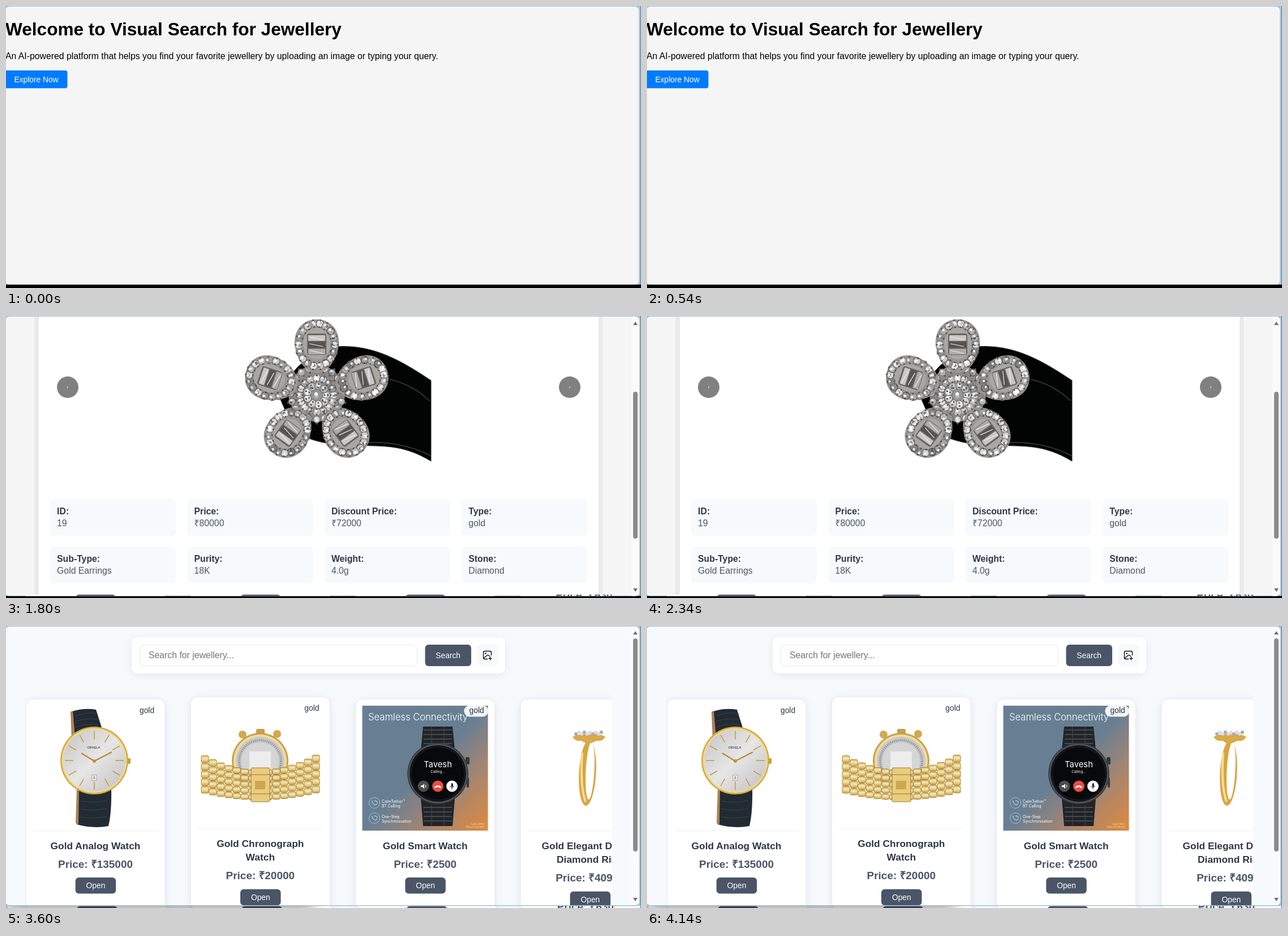
An HTML page that plays this animation: 1122x499 px, repeating every 4500 ms.

```html
<!DOCTYPE html>
<html lang="en">
<head>
<meta charset="utf-8">
<title>Jewellery search</title>
<style>
html, body { margin: 0; width: 100%; height: 100%; overflow: hidden; background: #a2c3d8; }
svg { display: block; width: 1122px; height: 499px; font-family: "Liberation Sans", Arial, sans-serif; }
text { white-space: pre; }
.b { font-weight: 700; }
.m { text-anchor: middle; }
.ui { font: 10.2px "Open Sans", "Noto Sans", sans-serif; }
.ad { font-family: Inter, sans-serif; fill: #fff; }
.soft { filter: drop-shadow(0 3px 8px rgba(40, 60, 90, .1)); }
.deep { filter: drop-shadow(0 5px 12px rgba(0, 0, 0, .5)); }
</style>
</head>
<body>
<svg viewBox="0 0 1122 499">
  <defs>
    <clipPath id="rail"><rect x="34" y="90" width="1037" height="420"/></clipPath>
    <clipPath id="side"><rect x="5" y="174" width="140" height="240"/></clipPath>
    <linearGradient id="ad" x1="0" y1="0" x2="1" y2="1">
      <stop offset=".5" stop-color="#687f93"/><stop offset=".72" stop-color="#a38572"/><stop offset="1" stop-color="#e08a3c"/>
    </linearGradient>
    <linearGradient id="link" x2="0" y2="1">
      <stop stop-color="#d9b762"/><stop offset=".4" stop-color="#f8eab4"/><stop offset="1" stop-color="#cda549"/>
    </linearGradient>
    <linearGradient id="dial" x1="0" y1="0" x2="1" y2="1">
      <stop stop-color="#c4c4c5"/><stop offset=".5" stop-color="#e6e6e6"/><stop offset="1" stop-color="#c0c0c1"/>
    </linearGradient>
  </defs>
  <g id="stage"></g>
</svg>
<script>
const INK = '#2d3748', SLATE = '#4a5568', PAGE = '#f7fafd';
const rep = (n, f) => Array.from({ length: n }, (_, k) => f(k)).join('');
const rect = (x, y, w, h, fill, r = 0, more = '') =>
  `<rect x="${x}" y="${y}" width="${w}" height="${h}" rx="${r}" fill="${fill}" ${more}/>`;
const dot = (x, y, r, fill, more = '') => `<circle cx="${x}" cy="${y}" r="${r}" fill="${fill}" ${more}/>`;
const oval = (x, y, rx, ry, fill, more = '') =>
  `<ellipse cx="${x}" cy="${y}" rx="${rx}" ry="${ry}" fill="${fill}" ${more}/>`;
const area = (d, fill, more = '') => `<path d="${d}" fill="${fill}" ${more}/>`;
const line = (d, color, w = 1, more = '') => area(d, 'none', `stroke="${color}" stroke-width="${w}" ${more}`);
const text = (x, y, size, fill, str, cls = '') =>
  `<text x="${x}" y="${y}" font-size="${size}" fill="${fill}" class="${cls}">${str}</text>`;
const ui = (x, y, str, fill = '#fff', cls = '') => `<text x="${x}" y="${y}" fill="${fill}" class="ui ${cls}">${str}</text>`;
const move = (x, y, str) => `<g transform="translate(${x} ${y})">${str}</g>`;

let seed = 7;
const rnd = () => (seed = seed * 16807 % 2147483647) / 2147483647;

// Rounded browser page that clips its content
let clips = 0;
function page(x, y, w, h, bg, body) {
  const id = 'page' + clips++;
  return `<clipPath id="${id}">${rect(x, y, w, h, '#000', 7)}</clipPath>
    <g clip-path="url(#${id})">${rect(x, y, w, h, bg)}${body}</g>`;
}
const desk = bottom => rect(0, 0, 1122, 499, '#a2c3d8') + rect(1121, 0, 1, 499, '#55809f') +
  rect(0, bottom, 1122, 499 - bottom, '#000');

const scrollbar = (y, h, track = '#fafbfc') => rect(1105, 0, 14, 497, track) + rect(1108, y, 8, h, '#8b8b8b', 4) +
  area('M1108 16l4-6 4 6zM1108 482l4 6 4-6z', '#6f6f6f');

function searchBar(hover) {
  return `<g class="soft">${rect(222, 21, 660, 64, '#fff', 10)}</g>` +
    rect(236.5, 34.5, 490, 37.5, '#fff', 7, 'stroke="#e2e8f0"') +
    text(252, 58, 15.79, '#757575', 'Search for jewellery...') +
    rect(740.5, 34, 81.5, 38, SLATE, 6) + text(781.2, 57.5, 13.8, '#fff', 'Search', 'm') +
    rect(832, 34, 38, 38, hover ? '#e2e8f0' : PAGE, 7) +
    line('M857.500 53v-5q0-2.500-2.500-2.500h-9q-2.500 0-2.500 2.500v9q0 2.500 2.500 2.500h5M844 58l6-5q1.500-1 3 0l2 2M855.500 55.500v6M852.500 58.500h6', '#111', 1.4) +
    dot(847.5, 49.5, 1.3, '#111');
}

function card(i, y, title, price, art) {
  const x = 35 + 291.3 * i, mid = x + 123, low = y + 24.7 * (title.length - 1);
  return `<g class="soft">${rect(x, y, 246, 400, '#fff', 13, 'stroke="#e2e8f0"')}</g>` + art +
    line(`M${x + 12.5} ${y + 233.5}h222`, '#edf0f4') +
    rect(x + 191.7, y + 11.5, 43, 20, '#fff', 10, 'fill-opacity=".9"') +
    text(x + 201, y + 25, 13.8, INK, 'gold') +
    title.map((t, k) => text(mid, y + 265.5 + 24.7 * k, 17.37, INK, t, 'b m')).join('') +
    text(mid, low + 298.5, 18.95, SLATE, 'Price: ₹' + price, 'b m') +
    rect(x + 87.7, low + 316, 71.5, 28.5, SLATE, 6) + text(mid + .5, low + 335, 13.8, '#fff', 'Open', 'm');
}
const rail = cards => `<g clip-path="url(#rail)">${cards}</g>`;

// Necklaces
function pendant() {
  const ruler = rep(51, k => line(`M80 ${224 + k * 2.96}h${k % 10 ? k % 5 ? -4 : -6 : -11}`, '#777', .6)) +
    rep(33, k => line(`M81 ${224 + k * 4.69}h${k % 16 ? k % 8 ? k % 4 ? 4 : 6 : 10 : 14}`, '#777', .6));
  const mark = (x, y, t) => `<text transform="translate(${x} ${y}) rotate(90)" font-size="7" class="b m">${t}</text>`;
  return ruler + rep(6, k => mark(62, 225 + k * 29.6, k)) + rep(3, k => mark(96, 225 + k * 75, k)) +
    line('M115 189Q137 243 161 281Q187 240 205 189', '#d9bf62', 2.2) +
    line('M115 189Q137 243 161 281Q187 240 205 189', '#f1e2a6', 1, 'stroke-dasharray="2 2"') +
    dot(161.5, 282, 3, 'none', 'stroke="#d2ac42" stroke-width="1.5"') +
    line('M162 286Q145 302 162 319Q179 302 162 286Z', '#dfae3c', 3.2);
}

function choker() {
  const around = (n, rx, ry, f) => rep(n, k => {
    const a = -1.83 - 4.71 * k / (n - 1);
    return f(437 + rx * Math.cos(a), 337 + ry * Math.sin(a));
  });
  const cord = 'M398 279C440 262 413 232 442 220C472 207 520 214 526 245C528 268 500 271 478 277';
  const braid = 'M476 279Q464 297 440 301M478 279Q469 298 473 318';
  return rect(338.8, 188.5, 222, 222, '#2d2826') +
    rep(18, k => line(`M339 ${192 + k * 12.5}l222-6`, '#37312f', 2)) +
    line(cord, '#a68d4a', 4.5) + line(cord, '#4c3d20', 1) +
    area('M399 276L366 267Q369 285 375 292L386 302Q391 288 400 281Z', '#1c9b6c') +
    line('M395 279L371 273M396 280L376 287M397 281L386 297', '#45bd90', .8) +
    around(15, 52, 43, (x, y) => dot(x, y, 6.5, '#151618', 'stroke="#55565a" stroke-width=".8"') + dot(x - 2, y - 2, 1.5, '#77797d')) +
    around(42, 41, 33, (x, y) => dot(x, y, 2.7, '#d8a94c')) + around(38, 37, 29, (x, y) => dot(x, y, 2.5, '#f0cd7c')) +
    around(22, 45, 36, (x, y) => dot(x, y, 1.8, '#b88432')) +
    line(braid, '#d9a84c', 5) + line(braid, '#a8382c', 5, 'stroke-dasharray="3 6"') + dot(477, 278, 5, '#8b4030');
}

function chain() {
  const loop = 'M712 211C672 238 672 316 701 347Q716 366 740 368Q766 366 780 347C809 316 809 238 769 211';
  const gem = x => dot(x - 2, 345, 3, '#8dbfb4') + dot(x + 1, 348, 3, '#df9fba') + dot(x + 3, 345, 2, '#8b9cc8');
  return rect(629.5, 188.5, 222, 222, '#f4f5f5') +
    line(loop, '#e0cb80', 3.3, 'stroke-dasharray="0 4" stroke-linecap="round"') + line(loop, '#eadba5', 1) +
    rep(9, k => oval(716 + k * 6, 210 - Math.sin(k / 8 * 3.14) * 2, 3.5, 2.2, 'none', 'stroke="#d6b85a" stroke-width="1.2"')) +
    dot(756, 209, 4.2, '#ead27f') + gem(702) + gem(780) +
    area('M740 369l4 5 1 5 3 4-4 1-2 2h-4l-2-2-4-1 3-4 1-5z', '#d8ba52') + dot(740, 379, 2.6, '#f0df9a');
}

const strand = () => rect(921.3, 188.5, 222, 222, '#f4f5f5') +
  line('M1032 189V384', '#dd8a72', 3.8, 'stroke-dasharray="0 4.2" stroke-linecap="round"') + line('M1032 189V384', '#c97660', 1.5) +
  area('M1031 264Q1020 285 1024 308L1032 321Q1036 316 1034 303Q1026 290 1034 268Z', '#cf7d66') +
  rep(7, k => dot(1028 - Math.sin(k / 2) * 3, 268 + k * 7, 2.2, k % 2 ? '#9fa5ab' : '#e6b5a4'));

const necklaces = () => rail(
  card(0, 177, ['Gold Pendant Necklace'], 22500, pendant()) + card(1, 177, ['Gold Choker Necklace'], 16741, choker()) +
  card(2, 177, ['Gold Chain Necklace'], 69033, chain()) + card(3, 177, ['Diamond Pendant', 'Necklace'], 63033, strand()));
const shop = hover => searchBar(hover) + text(47, 132, 23.69, INK, 'Necklace', 'b') + necklaces() + scrollbar(23, 83);

// Watches and ring
function analog() {
  return area('M114 153Q137 145 159 149L172 190 122 202Z', '#222a33') + area('M114 153l4-2 4 45-6 6Z', '#a98356') +
    area('M128 288L186 286Q187 330 181 355Q153 360 125 352Z', '#222a33') + area('M125 288l4 4-1 60-5-2Z', '#a98356') +
    rep(3, k => line(`M122 ${160 + k * 10}q20-7 40-4M132 ${311 + k * 14}q24 4 46-1`, '#39434e', 1)) +
    rect(213, 235, 7, 10, '#c99a38', 2) + dot(156, 239, 60, '#d5a840') + dot(156, 239, 57.5, '#f1d98e') + dot(156, 239, 55, 'url(#dial)') +
    rep(12, k => `<g transform="rotate(${k * 30} 156 239)">${rect(155.2, 187, 1.6, 15, '#c99c3f')}</g>`) +
    text(155, 218, 5.5, '#555', 'ORVELA', 'm b') + rect(152, 265, 8, 9, '#fff', 0, 'stroke="#888" stroke-width=".8"') +
    text(156, 272, 7, '#333', '8', 'm') + line('M156 240L133 226M156 240L187 224', '#bd8b2e', 2.5) + dot(156, 240, 3, '#c4922f');
}

function chrono() {
  const links = rep(15, c => rep(5, r => {
    const x = 345 + c * 14, u = (x + 7 - 449) / 105, h = 10.8 + 3.2 * u * u;
    return rect(x, 256 - 30 * u * u + r * h, 13, h - 1.2, 'url(#link)', 2.5, 'stroke="#a07a30" stroke-width=".9"');
  }));
  return dot(418, 193, 7, '#d2a951') + dot(479, 192, 7, '#d2a951') + rect(442, 183, 15, 12, '#c99f48', 3) +
    dot(449, 240, 50, '#c9a04c') + dot(449, 240, 47, '#f0dc9e') + dot(449, 240, 43, '#c9c9c9') +
    dot(449, 240, 37, 'none', 'stroke="#999" stroke-width="4" stroke-dasharray="2 1.5"') + dot(449, 240, 33, '#d5d5d5') +
    rect(430, 223, 38, 32, '#ededed') + links + rect(433, 252, 33, 60, '#e9cc7e', 2, 'stroke="#a07731"') +
    line('M433 264h33M433 298h33', '#a07731') + rect(440, 275, 18, 15, '#cfa750');
}

function smart() {
  const label = (y, a, b) => dot(651, y, 9.5, 'none', 'stroke="#a9d3df" stroke-width=".8"') +
    line(`M647 ${y - 4}q-1 5 6 8l3-3M651 ${y - 4}q5 0 5 4`, '#d7eef3', 1) +
    text(664, y, 6.9, '#fff', a, 'ad') + text(664, y + 7.5, 6.9, '#fff', b, 'ad');
  return rect(629.5, 142, 222, 222, 'url(#ad)') +
    `<g font-weight="300">${text(640, 168, 16.6, '#fff', 'Seamless Connectivity', 'ad')}</g>` +
    area('M737 179h52l4 42h-60zM733 306h60l-4 49h-52z', '#202327') +
    rep(4, k => line(`M738 ${185 + k * 8}h50M738 ${322 + k * 8}h50`, '#6a7177', 1)) + line('M752 179v35M774 179v35M752 318v36M774 318v36', '#454c52') +
    rect(812, 233, 7, 13, '#33373c', 2) + rect(814, 269, 4, 18, '#33373c', 2) +
    dot(763, 262, 54, '#3c4147') + dot(763, 262, 51, '#15171b', 'stroke="#70777d"') + dot(763, 262, 46, '#08090b') +
    text(763, 251, 14.8, '#fff', 'Tavesh', 'ad m') + text(763, 260.5, 6.2, '#fff', 'Calling...', 'ad m') +
    dot(737.5, 284.5, 10, '#4a4c4f') + area('M733 283h3l3-3v9l-3-3h-3z', '#fff') + line('M741 282q2 2 0 5', '#fff') +
    dot(763, 284.5, 10, '#ee4b41') + line('M757.500 287q5.500-5 11 0', '#fff', 3) +
    dot(788, 284.5, 10, '#fff') + rect(786.5, 279, 3.5, 7, '#333', 1.7) + line('M784.500 284q3.500 6 7 0M788 287v3', '#333') +
    label(314, 'CalmTether™', 'BT Calling') + label(341, 'One-Step', 'Synchronisation') +
    `<g text-anchor="end">${text(845, 353, 4.5, '#fbd2a6', 'Learn More')}${text(845, 358, 4.5, '#fbd2a6', 'Easy on phones')}</g>`;
}

const ring = () => oval(1027.5, 261, 15, 58, '#d9a441', 'transform="rotate(3 1027 261)"') +
  oval(1032, 257, 7.5, 51, '#fff', 'transform="rotate(3 1032 257)"') +
  line('M1018 225Q1014 285 1024 312', '#f6dd94', 4) +
  area('M1001 197Q1015 190 1030 193Q1046 190 1059 197Q1054 206 1043 204Q1028 213 1017 204Q1006 206 1001 197Z', '#d9a94a') +
  rep(10, k => dot(1007 + k * 5, 192 - k % 2 * 3, 3, k % 3 ? '#d8dbe2' : '#a4abb9'));

const watches = () => rail(
  card(0, 130, ['Gold Analog Watch'], 135000, analog()) + card(1, 126, ['Gold Chronograph', 'Watch'], 20000, chrono()) +
  card(2, 130, ['Gold Smart Watch'], 2500, smart()) + card(3, 130, ['Gold Elegant Double', 'Diamond Ring'], 40921, ring()));

// Product details
function flower() {
  const gray = (low, span) => { const v = low + rnd() * span | 0; return `rgb(${v},${v},${v})`; };
  const stone = (x, y, r) => dot(x, y, r, gray(130, 105), `stroke="${gray(70, 70)}" stroke-width="1.2"`) +
    dot(x + rnd() * 4 - 2, y + rnd() * 4 - 2, r * .4, gray(90, 165)) + dot(x - 1, y - 2, r * .3, '#fff');
  const stones = (n, rx, ry, r) => rep(n, k => {
    const a = k / n * 6.283, x = rx * Math.cos(a), y = ry * Math.sin(a);
    return stone(x, y, r) + dot(x * 1.16, y * 1.16, 1.7, '#5d5957') + dot(x * .83, y * .83, 1.4, '#4c4947');
  });
  // Each petal is a drop, narrow towards the centre
  const petal = k => `<g transform="translate(549 137) rotate(${k * 72}) translate(0 -86)">` +
    area('M0-45C28-45 41-22 39 0C36 24 22 48 0 50C-22 48-36 24-39 0C-41-22-28-45 0-45Z', '#9a9693') +
    stones(18, 32, 38, 6.6) + oval(0, -2, 24, 28, '#aaa6a3') + rect(-17, -20, 34, 38, '#686461', 4) +
    rep(3, j => rect(-15, -17 + j * 12, 30, 10, ['#c9c7c5', '#57534f', '#aeaba8'][j], 1) +
      line(`M-13 ${-14 + j * 12}l24 5`, '#eee', 1.2)) + '</g>';
  return area('M485 148Q500 75 585 54C650 50 700 80 751 114V257C700 226 665 231 615 229Q550 229 510 205Z', '#020303', 'stroke="#3d4042"') +
    line('M678 112Q720 122 748 150M640 224Q700 222 750 247', '#3c3f41', 1.5) +
    dot(549, 137, 50, '#8d8986') + move(549, 137, stones(20, 46, 46, 6)) + rep(5, petal) +
    move(549, 140, dot(0, 0, 36, '#95918e') + stones(16, 30, 30, 6.5) + stones(9, 17, 17, 7) + stone(0, 0, 10));
}

function details() {
  const info = [['ID:', '19'], ['Price:', '₹80000'], ['Discount Price:', '₹72000'], ['Type:', 'gold'],
    ['Sub-Type:', 'Gold Earrings'], ['Purity:', '18K'], ['Weight:', '4.0g'], ['Stone:', 'Diamond']];
  const arrow = (x, c) => dot(x, 126, 19, '#808080') + text(x, 129, 9, '#fff', c, 'm');
  return rect(50, 0, 1004, 499, '#eaeaea') + rect(58, 0, 989, 499, '#fff') + flower() + arrow(109, '‹') + arrow(996, '›') +
    info.map(([name, value], k) => {
      const x = 77.8 + k % 4 * 242.4, y = k < 4 ? 324 : 408;
      return rect(x, y, 222.5, 65, PAGE, 7) + text(x + 12.3, y + 27, 15.79, INK, name, 'b') + text(x + 12.3, y + 48, 15.79, SLATE, value);
    }).join('') + scrollbar(134, 260, '#fafafa');
}

// File dialog
const folder = (x, y) => area(`M${x} ${y}h5l2 2h6v9h-13z`, '#e9a930') + rect(x, y + 3, 13, 8, '#ffd263', 1);
const chevron = (x, y, s = 3.5) => line(`M${x - s} ${y - s / 2}l${s} ${s} ${s}-${s}`, '#ddd', 1.1);
const next = (x, y) => line(`M${x - 1.5} ${y - 3}l3 3-3 3`, '#bbb', 1.1);

function thumb(x, y, h, band, dial) {
  const cx = x + 38, cy = y + h / 2, r = h * .43;
  return rect(x, y, 77.5, h, '#b7babb') + rect(x + 14, y, 48, 7, '#4b7699') +
    area(`M${x} ${cy - 12}q38-11 77 0v22q-38 12-77 0z`, band) +
    rep(8, k => line(`M${x + 4 + k * 10} ${cy - 14}v27`, '#696560', .7)) +
    dot(cx, cy, r + 2, '#a7824f') + dot(cx, cy, r, '#d5c19d') + dot(cx, cy, r - 3, dial) +
    rep(12, k => `<g transform="rotate(${k * 30} ${cx} ${cy})">${rect(cx - .5, cy - r + 4, 1, 3, '#b59a69')}</g>`) +
    line(`M${cx - 6} ${cy - 5}l6 5 9-5`, '#987c4f', 1.2);
}

function files() {
  const bands = ['#b39a68', '#8c8b8a', '#a98e70', '#c0a67c', '#55514f', '#aaa7a2'];
  const dials = ['#e5e5e2', '#694331', '#343f3d', '#b8b1a4', '#171b20', '#dedede'];
  return rect(281.5, 295, 92, 118, '#4d4d4d', 0, 'stroke="#858585"') +
    ['124', '126', '129', '133', '136', '138'].map((n, k) => {
      const c = k % 3, low = k > 2, x = 164.3 + c * 123.2, y = low ? [334, 325, 324][c] : 212;
      return thumb(x, y, low ? 377 - y : 45, bands[k], dials[k]) +
        ui(x + 40, low ? 393 : 273, 'GBWA-20181203', '#fff', 'm') + ui(x + 40, low ? 407.5 : 288, '143' + n, '#fff', 'm');
    }).join('');
}

function sidebar() {
  const pc = y => rect(35, y - 9, 13, 9, '#35a7e3', 1) + rect(39, y, 5, 2, '#8dcaec');
  const pin = y => `<g transform="translate(119 ${y}) rotate(45)">${area('M-2.500-5h5v5l2 2h-9l2-2zM-.5 2h1v4h-1z', '#a5a5a5')}</g>`;
  return `<g clip-path="url(#side)">` + rect(7, 232, 120, 27.5, '#383838') +
    ['Videos', 'Wirenote Des', 'New folder (2)', 'Screenshots', 'Expenses', 'assets'].map((t, k) => {
      const y = 193 + k * 28.15;
      return (k ? folder(35, y - 9) : rect(35, 182, 12.5, 13, '#8c4fd0', 1) + area('M39 185l5 3.500-5 3.500z', '#fff')) + ui(51.5, y, t);
    }).join('') + pin(189) + pin(217) + line('M14 358.500h106', '#555') +
    pc(390) + ui(51.5, 390, 'This PC') + next(19.5, 386.5) + pc(418) + ui(51.5, 418, 'Network') + next(19.5, 414) +
    '</g>' + rect(131.5, 295, 6.5, 72.5, '#9b9b9b') + line('M144.500 175V414', '#3a3a3a');
}

function dialog() {
  const box = (x, y, w, h, fill, stroke) => rect(x + .5, y + .5, w, h, fill, 1, `stroke="${stroke}"`);
  const button = (x, w, t, fill = '#333') => rect(x + .5, 455.5, w, 20.5, fill, 2, 'stroke="#9a9a9a"') + ui(x + w / 2 + .5, 470, t, '#fff', 'm');
  return `<g class="deep">${rect(4.5, 78, 538.5, 414, '#202020', 7, 'stroke="#555"')}</g>` +
    rect(5, 102, 537.5, 44, '#1b1b1b') + rect(5, 174, 537.5, 240, '#191919') +
    area('M5 414H542.500V485q0 6.500-6.500 6.500H11.500q-6.500 0-6.500-6.500z', '#333') +
    dot(18, 89.5, 7, '#2b9fc6') + ui(28.5, 93.5, 'Open') + line('M524 85.500l8.500 8.500M532.500 85.500l-8.500 8.500', '#fff', 1.1) +
    line('M29 124.500H19M23.500 120l-4.500 4.500 4.500 4.500M108.500 130V120M104 124.500l4.500-4.500 4.500 4.500', '#fff', 1.3) +
    line('M49.500 124.500h10M55 120l4.500 4.500-4.500 4.500', '#888', 1.3) + chevron(81, 124) +
    box(127, 108.5, 222.5, 30, '#191919', '#4d4d4d') + folder(134, 118.5) + ui(153.5, 127, '«', '#aaa') +
    ui(165, 128, 'data...') + next(201.5, 124.5) + ui(212, 128, 'WRIST...') + chevron(301, 124, 4.5) +
    line('M337.500 122a5 5 0 1 0 .5 3.500M338 118.500v4h-4', '#ddd', 1.2) +
    box(357, 108.5, 178, 30, '#191919', '#4d4d4d') + ui(364, 128.5, 'Search WRISTWATCH', '#858585') +
    dot(519.5, 123, 3, 'none', 'stroke="#bbb" stroke-width="1.2"') + line('M517 125.500l-4 4', '#bbb', 1.2) +
    ui(21, 164, 'Organize') + ui(98, 164, 'New folder') + area('M66.500 158.500h5.500l-2.750 3zM460 158.500h5.500l-2.750 3z', '#ddd') +
    rect(439, 153.5, 13, 12.5, '#fff', 1) + rect(441, 155.5, 9, 7, '#777') +
    rect(484, 153.5, 13, 12.5, '#fff', 1) + rect(485.5, 155.5, 6, 9, '#222') + rect(492, 155.5, 4, 9, '#4ba7e9') +
    dot(522, 159.5, 7, '#1583d7') + ui(522, 163.5, '?', '#fff', 'm b') +
    sidebar() + files() + rect(532, 191, 7, 23.5, '#9b9b9b') +
    ui(113, 444, 'File name:') + box(164, 430, 187, 19, '#383838', '#858585') + ui(167, 444, 'GBWA-20181203143136') + chevron(343.5, 439.5) +
    box(362, 430, 165, 19, '#383838', '#858585') + ui(365, 444, 'All files') + chevron(519, 439.5) +
    button(246, 104.5, 'Upload from mobile') + button(362, 76.5, 'Open', '#454545') + button(450, 76.5, 'Cancel') +
    rep(3, k => rep(k + 1, j => rect(539 - j * 2.5, 486 + k * 2.5 - 1, 1.3, 1.3, '#bbb')));
}

const tooltip = rect(807, 10, 86.5, 29, INK, 4) + area('M843 38.500h14l-7 7z', INK) + text(850.2, 29, 13.42, '#fff', 'Upload here', 'm');

const welcome = desk(493) + page(-1, 1, 1119.5, 492, '#f5f5f5',
  text(-1, 52, 31.58, '#000', 'Welcome to Visual Search for Jewellery', 'b') +
  text(-1, 94, 15.79, '#000', 'An AI-powered platform that helps you find your favorite jewellery by uploading an image or typing your query.') +
  rect(-3, 114, 111.5, 31.5, '#007bff', 4) + text(14.5, 134.5, 13.8, '#fff', 'Explore Now'));
const browse = desk(495.5) + page(-1, 2, 1120, 493.5, PAGE, shop(false) + tooltip);
const product = browse + rect(0, 0, 1119, 8, '#a2c3d8') + page(-1, 1, 1120, 492, '#f5f5f5', details());
const upload = desk(499) + move(2.5, 2.5, page(-1, 2, 1120, 496, PAGE, shop(true))) + dialog();
const results = upload + rect(0, 0, 1122, 495.5, '#a2c3d8') + rect(1121, 0, 1, 495, '#55809f') +
  move(0, -1, page(-1, 2, 1120, 493, PAGE, searchBar(false) + watches() + scrollbar(23, 377)));

const scenes = [welcome, browse, product, upload, results];
const stage = document.getElementById('stage');
let shown = -1;
function tick() {
  const i = Math.floor(performance.now() % 4500 / 900);
  if (i !== shown) stage.innerHTML = scenes[shown = i];
  requestAnimationFrame(tick);
}
tick();
</script>
</body>
</html>
```
